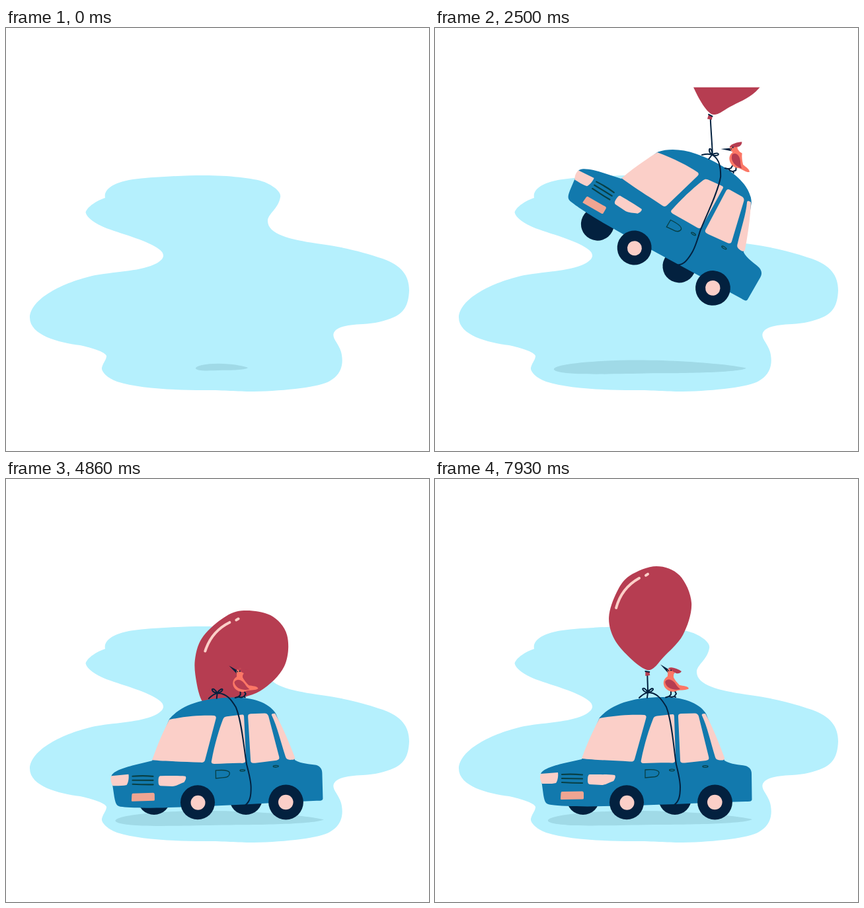
Recreate the animation shown at these times as an HTML page. Size 640 by 640 pixels, loop 8000 ms.

```html
<!DOCTYPE html>
<html lang="en">
<head>
<meta charset="utf-8">
<title>Floating car</title>
<style>
html, body { margin: 0; width: 100%; height: 100%; overflow: hidden; background: #fff; }
svg { display: block; width: 100vw; height: 100vh; }
.blue { fill: #1279ad; }
.navy { fill: #03213f; }
.pink { fill: #fbcfc8; }
.red { fill: #b63d51; }
.coral { fill: #fb7766; }
.line { fill: none; stroke: #03213f; stroke-width: 2; stroke-linecap: round; stroke-linejoin: round; }
.trim { fill: none; stroke: #083f44; stroke-width: 1.3; }
.grille { stroke-width: 2.2; stroke-linecap: round; }
.shine { fill: none; stroke: #fbcfc8; stroke-width: 4; stroke-linecap: round; }
</style>
</head>
<body>
<svg viewBox="0 0 640 640">
  <clipPath id="stage"><rect y="89.7" width="640" height="551"/></clipPath>
  <path fill="#b5f0fd" d="M150,257C147,243 165,231 205,227.5C240,224.5 270,223 300,223C335,223 375,227 391,233C405,239 417,248 415,256C412,274 396,281 396,292C396,312 430,320 470,326C510,331 540,339 570,349C598,359 610,374 610,397C609,420 602,430 588,437C572,444 558,447 540,448C520,449 506,451 499,457C489,467 502,474 507,490C512,510 506,525 490,534C475,543 425,549 375,550C345,550 335,548 300,548C250,548 200,545 168,535C152,529 144,519 145,514C147,506 152,502 152,496C150,490 130,484 112,480C80,476 36,465 36,438C37,410 85,385 135,374C170,368 205,368 228,356C240,349 241,342 232,335C215,322 180,313 152,303C135,296 122,287 120.5,279C123,270 138,261 150,257Z"/>
  <path id="shadow" fill="#a0dae7" d="M171,516C175,508 240,502 305,502C380,502 455,509 480,515C470,521 400,523 330,523C280,524 240,525 210,524C185,523 169,520 171,516Z"/>
  <g clip-path="url(#stage)">
    <g id="farWheels" class="navy">
      <circle cx="224" cy="483" r="25"/>
      <circle cx="363" cy="483" r="25"/>
    </g>
    <path id="string" class="line"/>
    <path id="balloon" class="red"/>
    <g id="knot">
      <path class="red" d="M-3,0L3,0L4,5L-3,6Z"/>
      <path class="line" d="M-3,-1L3,0"/>
    </g>
    <path id="shine" class="shine" d="M0,0Q8,-30 35,-45M45,-49L48,-51"/>
    <g id="body">
      <path class="blue" d="M160,448C159,440 178,434 195,430L222,424L249,361C268,340 300,330 345,330C382,330 402,342 410,355L438,426C448,432 460,432 470,434C476,436 479,440 479,446L479.5,485C479,488 476,488 470,488C400,490 330,494 255,495C225,496 190,495 176,493C167,492 166,489 164,478Z"/>
      <g class="pink">
        <path d="M222,423C232,395 242,375 249,362C275,357 300,356 317,357C320,358 320,360 319,363L302,424C301,427 299,428 295,427.5C270,426 240,425 222,423Z"/>
        <path d="M312,425C317,400 324,378 330,363C331,360 333,359 336,358.5L359,356C362,356 362,358 362,361L364,424C364,428 362,429.5 358,429.5C345,429 330,430 316,430C312,430 311,428 312,425Z"/>
        <path d="M368,360C368,356 369,355.5 372,355L393,354.5C396,354.5 398,356 399,359L414,420C415,424 414,425 410,426L378,429.5C373,430 371,429 371,425Z"/>
        <path d="M404,358C403,355.5 405,355 409,355C420,375 430,400 438,422C438,426 435,425.5 431,425.5C427,425 425,424 424,421C416,395 412,375 404,358Z"/>
        <path d="M160,446L186,444C187,450 185,458 183,460C177,461.5 168,461 162,461C159,456 158,450 160,446Z"/>
        <path d="M234,447C248,447 262,447 272,448C274,450 272,454 270,457C264,459 258,463 252,463L234,462C231,461 231,458 231,455C231,450 232,447 234,447Z"/>
      </g>
      <path fill="#f0a592" d="M192,473L223,472.5Q225,473 225,475L225,483Q225,484.5 223,484.5L191,485Q189.5,485 190,483L190.5,475Q191,473 192,473Z"/>
      <path class="trim grille" d="M192,447Q208,446 223,447.5M192,453L223,453.5M192,459Q208,460 223,460"/>
      <path class="trim" d="M318,440C330,439 338,440 339,444C339,449 334,451 328,451L318,452Z"/>
      <ellipse class="trim" cx="358.5" cy="440.5" rx="3.8" ry="1.3"/>
      <ellipse class="trim" cx="409" cy="435" rx="4" ry="1.3"/>
    </g>
    <g id="nearWheels">
      <circle class="navy" cx="290" cy="489.3" r="26"/>
      <circle class="pink" cx="290.5" cy="489.8" r="11"/>
      <circle class="navy" cx="423.5" cy="489" r="26.4"/>
      <circle class="pink" cx="423.3" cy="489" r="11.3"/>
    </g>
    <g id="rider">
      <path class="line" d="M309,331C313,327 318,323 324,323C336,324 343,333 350,345C359,368 361,408 365,432C369,448 371,456 371,466C371,480 369,488 362,493"/>
      <path class="line" d="M322,323C314,322 312,315 317,317Q320,319 322,323C330,322 332,316 328,317Q324,319 322,323L321,331"/>
      <path class="line" d="M357,321L357,326L354,329L349,330.5M354,329L358,330M363,321L365,325L362,329L358,330M362,329L364,330"/>
      <path id="neck" stroke="#fb7766" stroke-width="9" stroke-linecap="round"/>
      <path class="coral" d="M353,298C347,301 344,307 347,314C351,321 360,324 367,320C373,319 380,320 384,317C383,313 375,313 370,312C366,308 362,303 360,298Z"/>
      <path class="red" d="M348,307C352,300 360,304 364,310C367,315 370,317 371,318C363,320 350,318 348,307Z"/>
      <g id="head">
        <path class="navy" d="M-16,-10.5L-2,-2L-4.5,2.5Z"/>
        <circle class="coral" cx="0.5" cy="0" r="5.8"/>
        <path class="red" d="M-4,-5C2,-7 10,-4 16,0Q13,4 8,3Q2,0 -4,-5Z"/>
        <circle class="navy" cx="0" cy="-1.5" r="1.1"/>
        <circle class="navy" cx="-3.5" cy="-1" r="0.9"/>
      </g>
    </g>
  </g>
</svg>
<script>
const LOOP = 8000, FALL = 0.19;
const TOUCH = 3005; // rear wheel meets the ground
const PIVOT = [423, 489], BOW = [322, 322], HEAD = [357, 291], KNOT = [-5, 99];
const outline = [
  [-10, 94], [-33, 76], [-55, 49], [-63, 16], [-51, -22], [-31, -47],
  [9, -61], [44, -47], [62, -5], [49, 43], [19, 77], [3, 94]];

const el = id => document.getElementById(id);
const set = (id, name, value) => el(id).setAttribute(name, value);
const move = (id, x, y, rest = '') => set(id, 'transform', `translate(${x} ${y}) ${rest}`);

// Progress from 0 to 1 between two times: even, smooth, or braking
const ramp = (t, a, b) => Math.min(1, Math.max(0, (t - a) / (b - a)));
const ease = (t, a, b) => (1 - Math.cos(Math.PI * ramp(t, a, b))) / 2;
const brake = (t, a, b) => Math.sin(Math.PI / 2 * ramp(t, a, b));

function rotate([x, y], deg) {
  const r = deg * Math.PI / 180, c = Math.cos(r), s = Math.sin(r);
  return [x * c - y * s, x * s + y * c];
}

function smoothLoop(pts) {
  const n = pts.length, p = i => pts[(i + n) % n];
  let d = `M${p(0)}`;
  for (let i = 0; i < n; i++) {
    const h1 = p(i).map((v, k) => v + (p(i + 1)[k] - p(i - 1)[k]) / 6);
    const h2 = p(i + 1).map((v, k) => v - (p(i + 2)[k] - p(i)[k]) / 6);
    d += `C${h1} ${h2} ${p(i + 1)}`;
  }
  return d + 'Z';
}

function drawCar(t) {
  const land = ramp(t, TOUCH, 3360), settle = ease(t, 4000, 5150);
  const wheelY = PIVOT[1] + FALL * Math.min(0, t - TOUCH);
  const drop = -7.2 + 23.2 * ease(t, TOUCH, 3290) - 19.5 * ease(t, 3290, 3950) + 3.5 * settle;
  const body = {
    x: 422 + land,
    y: wheelY + drop,
    angle: 30.5 - 36 * brake(t, 2985, 4000) + 5.5 * settle
  };
  const turn = a => `rotate(${a}) translate(${-PIVOT[0]} ${-PIVOT[1]})`;
  for (const id of ['farWheels', 'nearWheels'])
    move(id, 420 + 3 * land, wheelY, turn(27.3 * (1 - land)));
  for (const id of ['body', 'rider'])
    move(id, body.x, body.y, turn(body.angle));
  return body;
}

function drawShadow(t) {
  const grow = ramp(t, 0, 2500) ** 1.2, dip = ease(t, 2500, 4070), settle = ease(t, 4070, 5200);
  const left = 287 - 107 * grow - 35 * dip + 26 * settle;
  const right = 366 + 105 * grow + 13 * dip - 4 * settle;
  const height = 0.48 + 0.47 * grow + 0.15 * dip - 0.1 * settle;
  const y = 513.3 + 1.7 * dip - 1.5 * settle;
  move('shadow', left, y, `scale(${(right - left) / 309} ${height}) translate(-171 -513.5)`);
}

// The bird keeps its head level and ducks when the nose dips
function drawHead(angle) {
  const lift = Math.max(angle, 0), duck = Math.max(-angle, 0) / 5.5;
  const x = HEAD[0] - 0.4 * lift - 2.6 * duck, y = HEAD[1] + 0.23 * lift + 5.8 * duck;
  move('head', x, y, `rotate(${-2.2 * lift - 9 * duck})`);
  set('neck', 'd', `M${x},${y}L356,303`);
}

function drawBalloon(t, body) {
  const tip = ease(t, 2900, 4070), rise = ease(t, 4070, 6700), back = ease(t, 6960, 8200);
  const sway = Math.sin(Math.PI * tip), lag = Math.sin(Math.PI * rise);
  const slump = tip ** 3 * (1 - rise) ** 2;
  const size = 1 + 0.05 * (tip - rise);
  const angle = 18 + 20 * tip - 47 * rise + 10 * back;
  const cx = 452 - 77 * tip - 64 * rise + 17 * back;
  const cy = 40 + 0.16 * (Math.min(t, 3290) - 2500) + 111 * brake(t, 3290, 3950) - 96 * rise + 13 * back;
  const place = (p, a = angle) => {
    const [x, y] = rotate(p, a);
    return [cx + x * size, cy + y * size];
  };

  // The lower part bends towards the lagging knot
  const bend = [-17 * lag, -5 * lag];
  set('balloon', 'd', smoothLoop(outline.map(p => {
    const w = Math.max(0, (p[1] - 20) / 76) ** 2;
    return place(p).map((v, k) => v + w * bend[k]);
  })));
  const [kx, ky] = place(KNOT).map((v, k) => v + bend[k]);
  move('knot', kx, ky, `rotate(${angle})`);

  const tilt = angle - 41 * slump, [hx, hy] = place([-52, 2], tilt);
  move('shine', hx - 10 * slump, hy + 5 * slump, `rotate(${tilt})`);

  const [ox, oy] = rotate([BOW[0] - PIVOT[0], BOW[1] - PIVOT[1]], body.angle);
  const bx = body.x + ox, by = body.y + oy;
  const h1 = [bx + 20 * sway - 18 * lag, by - 10 + 10 * sway + 30 * lag];
  const h2 = [kx - 18 * sway, ky + 12];
  set('string', 'd', `M${bx},${by}C${h1} ${h2} ${kx},${ky}`);
}

function draw(t) {
  const body = drawCar(t);
  drawShadow(t);
  drawHead(body.angle);
  drawBalloon(t, body);
}

const start = performance.now();
function tick() {
  draw((performance.now() - start) % LOOP);
  requestAnimationFrame(tick);
}
tick();
</script>
</body>
</html>
```
